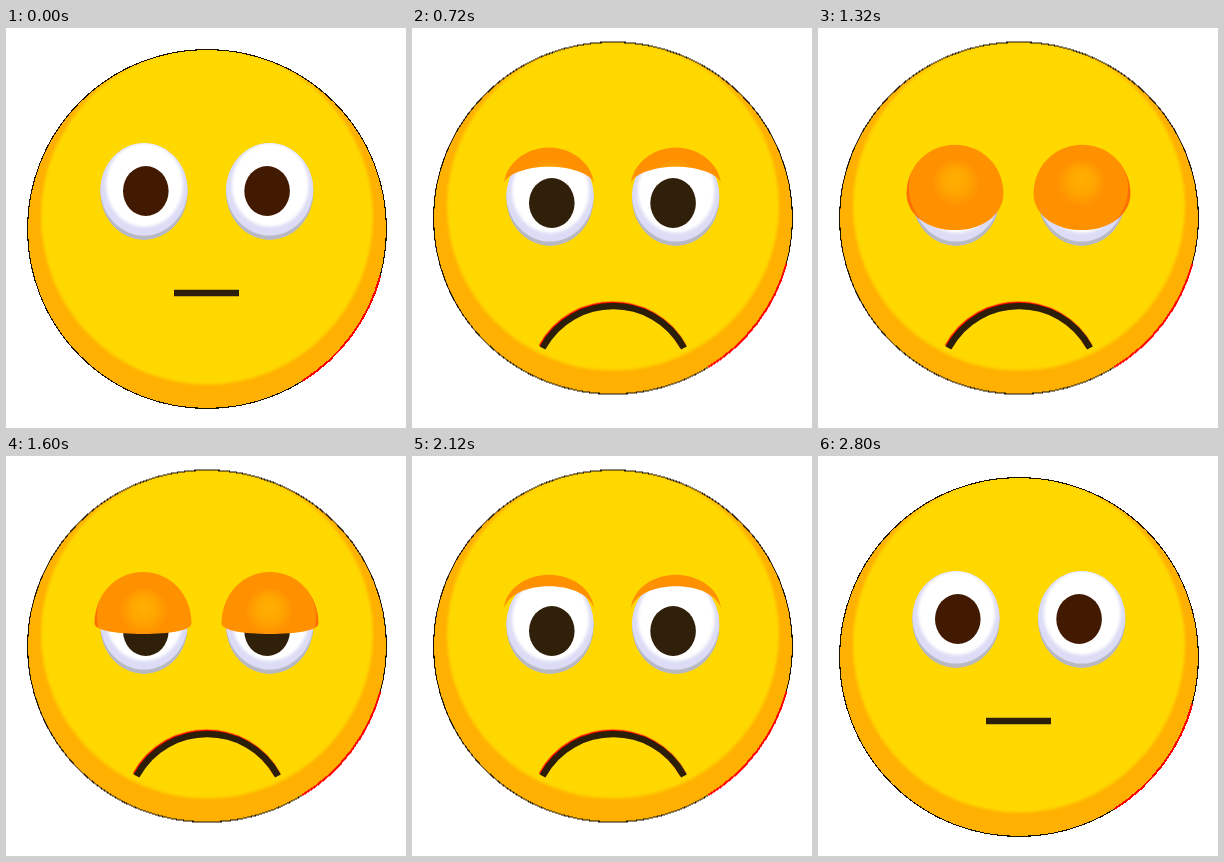
Recreate the animation shown at these times as an HTML page without scripts. Size 400x400 px, loop 3.04 s.

```html
<!DOCTYPE html>
<html lang="en">
<head>
<meta charset="utf-8">
<title>Weary face</title>
<style>
  html, body { margin: 0; width: 100%; height: 100%; overflow: hidden; background: #fff; }
  svg { display: block; width: 100vw; height: 100vh; }

  .face, .eyes, .rim, .pupils, .mouth, .lid {
    animation: 3040ms cubic-bezier(.333, 0, .667, 1) infinite;
  }
  .face { animation-name: squash; transform-origin: 201px 201px; }
  .eyes { animation-name: eyes; }
  .rim { animation-name: tint; }
  .pupils { animation-name: pupils; }
  .mouth { animation-name: frown; }
  .mouth.edge { animation-name: frown, appear; }
  .lid { animation-name: blink; }

  @keyframes squash {
    0%, 92.105%, 100% { transform: none; }
    18.421%, 73.684% { transform: translateY(-11px) scaleY(.981); }
  }
  @keyframes eyes {
    0%, 92.105%, 100% { transform: none; }
    18.421%, 73.684% { transform: translateY(6px); }
  }
  @keyframes tint {
    0%, 18.421%, 55.263%, 100% { fill: #b9b9c4; }
    36.842% { fill: #f4c6b4; }
  }
  @keyframes pupils {
    0%, 92.105%, 100% { transform: none; fill: #421a02; }
    18.421%, 73.684% { transform: translateY(12px); fill: #30200a; }
  }
  @keyframes appear {
    0%, 92.105%, 100% { opacity: 0; }
    18.421%, 73.684% { opacity: 1; }
  }

  /* The mouth lengthens and bends together, so its ends follow a curve. */
  @keyframes frown {
    0%, 92.105%, 100% {
      d: path("M168 265C189.7 265 211.3 265 233 265");
      animation-timing-function: cubic-bezier(.333, 0, .667, .427);
    }
    6.005%, 86.1% {
      d: path("M154.6 271.3C185 267 216 267 246.4 271.3");
      animation-timing-function: linear;
    }
    86.1% { animation-timing-function: cubic-bezier(.333, .573, .667, 1); }
    9.211%, 82.894% {
      d: path("M142.3 281.9C179.8 267.7 221.2 267.7 258.7 281.9");
      animation-timing-function: linear;
    }
    11.842%, 80.263% {
      d: path("M134.2 297.6C173.5 267.6 228 267.6 267.3 297.6");
      animation-timing-function: cubic-bezier(.333, .563, .667, 1);
    }
    80.263% { animation-timing-function: linear; }
    18.421%, 73.684% {
      d: path("M130.5 320C160.8 264.1 241.7 264.1 272 320");
      animation-timing-function: cubic-bezier(.333, 0, .667, .437);
    }
  }

  /* Open, shut, half open, nearly open, open. */
  @keyframes blink {
    0%, 18.421%, 73.684%, 100% {
      d: path("M93 153C95 135 115 120 137 120C159 120 179 135 181 153C179 135 159 120 137 120C115 120 95 135 93 153Z");
    }
    36.842% {
      d: path("M88.5 165C88.5 138 110 117 137 117C164 117 185.5 138 185.5 165C185.5 192 164 213 137 213C110 213 88.5 192 88.5 165Z");
    }
    55.263% {
      d: path("M88.5 168C88.5 138 110 116 137 116C164 116 185.5 138 185.5 168C184 174 164 176 137 176C110 176 90 174 88.5 168Z");
      animation-timing-function: cubic-bezier(.333, 0, .667, .7);
    }
    69.737% {
      d: path("M92 152C94 133 114 118.8 137 118.8C160 118.8 180 133 182 152C177 139 160 130.5 137 130.5C114 130.5 97 139 92 152Z");
      animation-timing-function: cubic-bezier(.333, .61, .667, 1);
    }
  }
</style>
</head>
<body>
<svg viewBox="0 0 400 400">
  <defs>
    <clipPath id="faceClip"><circle cx="201" cy="201" r="179.5"/></clipPath>
    <clipPath id="eyeClip"><ellipse cx="138" cy="163.5" rx="44" ry="48.5"/></clipPath>
    <filter id="soft"><feGaussianBlur stdDeviation="1.5"/></filter>
    <radialGradient id="lidFill" gradientUnits="userSpaceOnUse" cx="139" cy="160" r="48.5" fx="137" fy="150">
      <stop offset="0" stop-color="#ffb000"/>
      <stop offset=".25" stop-color="#ffa600"/>
      <stop offset=".5" stop-color="#ff9000"/>
      <stop offset=".98" stop-color="#ff9000"/>
      <stop offset="1" stop-color="#ff6e00"/>
    </radialGradient>
    <g id="eye" clip-path="url(#eyeClip)">
      <ellipse class="rim" cx="138" cy="163.5" rx="44" ry="48.5"/>
      <ellipse cx="138" cy="160" rx="43.8" ry="47.5" fill="#dcdcf6"/>
      <ellipse cx="138.5" cy="157" rx="38.5" ry="42" fill="#fff" filter="url(#soft)"/>
    </g>
    <ellipse id="pupil" cx="139.8" cy="163" rx="22.8" ry="25"/>
  </defs>

  <g class="face">
    <g clip-path="url(#faceClip)">
      <rect width="400" height="400" fill="#ffb000"/>
      <ellipse cx="201" cy="188.5" rx="166" ry="168" fill="#ffd800" filter="url(#soft)"/>
    </g>
    <g fill="none" shape-rendering="crispEdges">
      <circle cx="201" cy="201" r="179.5" stroke="#1a1200" stroke-width="1.1"/>
      <path d="M374.4 247.5A179.5 179.5 0 0 1 296.1 353.2" stroke="#f00" stroke-width="2"/>
    </g>
  </g>

  <g class="eyes">
    <use href="#eye"/>
    <use href="#eye" x="125.7"/>
  </g>
  <g class="pupils">
    <use href="#pupil"/>
    <use href="#pupil" x="121.3"/>
  </g>
  <g fill="url(#lidFill)">
    <path class="lid"/>
    <g transform="translate(401) scale(-1 1)"><path class="lid"/></g>
  </g>
  <g fill="none" stroke-width="6.5">
    <g transform="translate(-.7 -1.3)"><path class="mouth edge" stroke="#f00"/></g>
    <path class="mouth" stroke="#2c1f0a"/>
  </g>
</svg>
</body>
</html>
```
